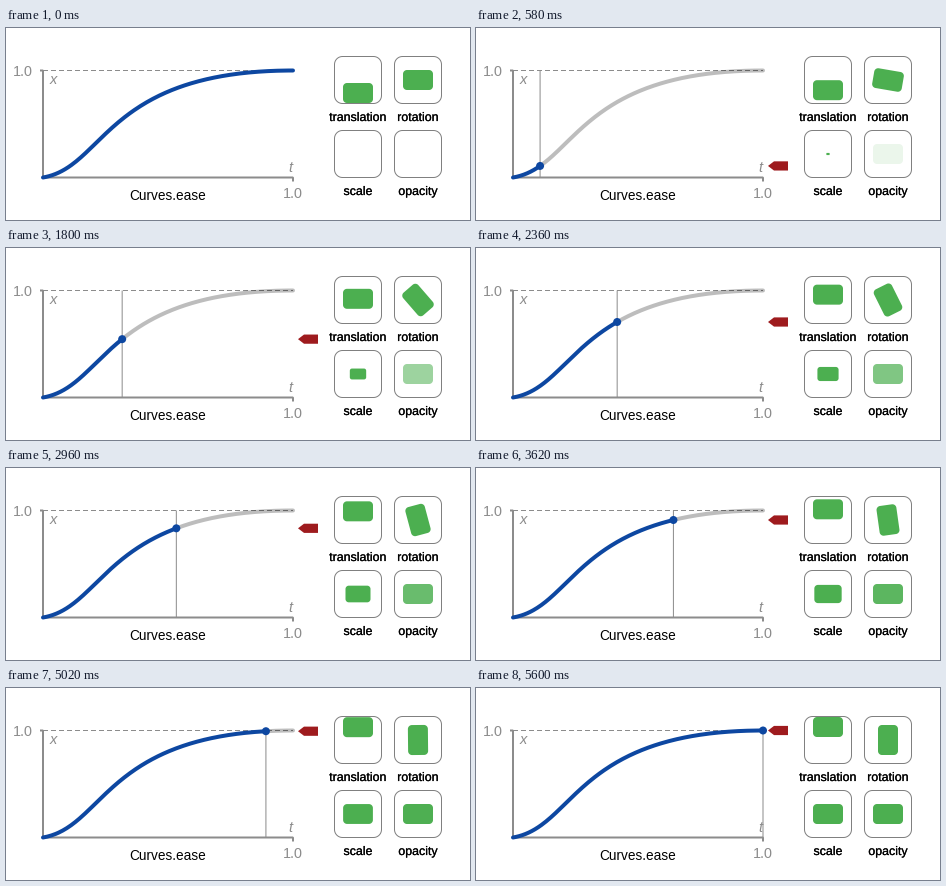
Recreate the animation shown at these times as a matplotlib script. Size 464 by 192 pixels, loop 5620 ms.

```python
import numpy as np
import matplotlib.pyplot as plt
from matplotlib.animation import FuncAnimation
from matplotlib.patches import Circle, Polygon
from matplotlib.patheffects import withStroke
from matplotlib.transforms import Affine2D

W, H, DPI = 464, 192, 64
PT = 72 / DPI                       # points per pixel
LEFT, RIGHT, TOP, BOTTOM = 37, 287, 42.5, 149.5
STEPS, TICK, TICKS = 120, 20, 281
BLUE, GREEN, RED = "#0D47A1", "#4CAF50", "#9E1B1E"
GREY = "#8C8C8C"

fig = plt.figure(figsize=(W / DPI, H / DPI), dpi=DPI, facecolor="white")
ax = fig.add_axes([0, 0, 1, 1])
ax.set(xlim=(0, W), ylim=(H, 0))
ax.axis("off")

# Cubic Bezier (0.25, 0.1, 0.25, 1.0)
u = np.linspace(0, 1, 2001)
BX = 3 * (1 - u) ** 2 * u * 0.25 + 3 * (1 - u) * u ** 2 * 0.25 + u ** 3
BY = 3 * (1 - u) ** 2 * u * 0.1 + 3 * (1 - u) * u ** 2 + u ** 3


def ease(t):
    return np.interp(t, BX, BY)


def to_x(t):
    return LEFT + t * (RIGHT - LEFT)


def to_y(v):
    return BOTTOM - v * (BOTTOM - TOP)


def line(xs, ys, width, color, **kw):
    return ax.plot(xs, ys, color=color, lw=width * PT, snap=False, **kw)[0]


def label(x, y, text, size, color="black", medium=False, **kw):
    if medium:
        kw["path_effects"] = [withStroke(linewidth=0.2 * PT, foreground=color)]
    ax.text(x, y, text, fontsize=size * PT, color=color, ha="center",
            va="baseline", family="Liberation Sans", zorder=6, **kw)


def round_box(cx, cy, w, h, r, **kw):
    """Rectangle about a centre with circular corners."""
    points = []
    for k, (sx, sy) in enumerate([(1, 1), (-1, 1), (-1, -1), (1, -1)]):
        a = np.linspace(k, k + 1, 13) * np.pi / 2
        points.append(np.column_stack([cx + sx * (w / 2 - r) + r * np.cos(a),
                                       cy + sy * (h / 2 - r) + r * np.sin(a)]))
    return ax.add_patch(Polygon(np.vstack(points), snap=False, **kw))


def tile(cx, cy, name):
    """Framed cell with a green card; returns the card and its centre."""
    round_box(cx, cy, 47, 47, 8, fc="none", ec="#808080", lw=PT, zorder=2)
    label(cx, cy + 41, name, 12.4, medium=True)
    card = round_box(0, 0, 30, 20, 4, fc=GREEN, ec="none", lw=0, zorder=3)
    return card, cx, cy


def place(cell, dy=0, angle=0, scale=1):
    card, cx, cy = cell
    move = Affine2D().scale(scale).rotate_deg(angle).translate(cx, cy + dy)
    card.set_transform(move + ax.transData)


# Static chart
line([LEFT, RIGHT], [TOP, TOP], 1, GREY, dashes=(5, 3), zorder=1,
     dash_capstyle="butt")
line([LEFT - 3, LEFT, LEFT, RIGHT, RIGHT],
     [TOP, TOP, BOTTOM, BOTTOM, BOTTOM + 4], 2, GREY,
     zorder=1, solid_capstyle="butt", solid_joinstyle="bevel")
label(17, 47.5, "1.0", 14.4, GREY)
label(287, 170, "1.0", 14.4, GREY)
label(47, 56, "x", 14.6, GREY, style="italic")
label(284, 144, "t", 14.6, GREY, style="italic")
label(162, 172, "Curves.ease", 13.6)

# Moving parts
rest = line([], [], 4, "black", alpha=0.26, zorder=2, solid_capstyle="round")
done = line([], [], 4, BLUE, zorder=4, solid_capstyle="round")
guide = line([], [], 1, GREY, zorder=3, solid_capstyle="butt")
dot = ax.add_patch(Circle((0, 0), 4, fc=BLUE, ec="none", zorder=5))
arrow = ax.add_patch(Polygon([(0, 0)] * 3, fc=RED, ec="none", zorder=5,
                             snap=False))

slide = tile(352, 52, "translation")
spin = tile(412, 52, "rotation")
grow = tile(352, 126, "scale")
fade = tile(412, 126, "opacity")
place(fade)


def draw_curve(art, t0, t1):
    t = np.linspace(t0, t1, 160)
    art.set_data(to_x(t), to_y(ease(t)))


def step_at(tick):
    """Steps come in threes, held for 1, 5 and 1 ticks."""
    group, r = divmod(tick, 7)
    return 3 * group + (r > 0) + (r > 5)


def update(tick):
    step = step_at(tick)
    t = step / STEPS
    v = float(ease(t))
    x, y = to_x(t), to_y(v)
    running = step > 0

    for art in (rest, guide, dot, arrow, grow[0]):
        art.set_visible(running)
    draw_curve(done, 0, t if running else 1)
    draw_curve(rest, t, 1)
    guide.set_data([x, x], [TOP, BOTTOM])
    dot.center = x, y
    arrow.set_xy([(292, y), (298, y - 4.6), (312, y - 4.6),
                  (312, y + 4.6), (298, y + 4.6)])

    place(slide, dy=13 - 26 * v)
    place(spin, angle=90 * v)
    place(grow, scale=max(v, 1e-4))
    fade[0].set_alpha(v)
    return []


anim = FuncAnimation(fig, update, frames=TICKS, interval=TICK,
                     init_func=lambda: update(0), repeat=True, repeat_delay=0,
                     blit=False)
plt.show()
```
